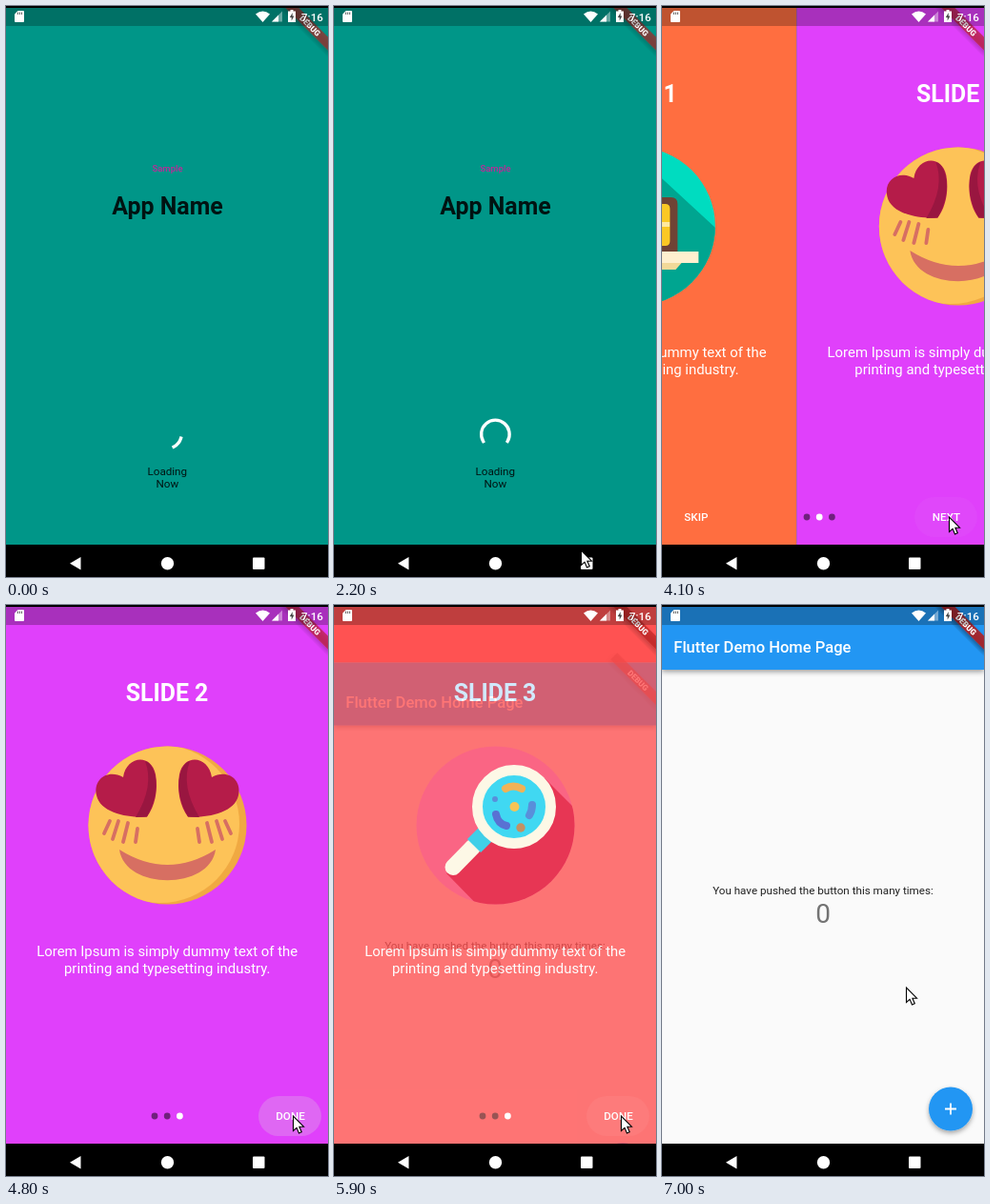
These frames come from a looping animation (338x600 px, 7.1 s). An HTML page:

```html
<!DOCTYPE html>
<html lang="en">
<head>
<meta charset="utf-8">
<title>Intro slider demo</title>
<style>
  html, body { margin: 0; width: 100%; height: 100%; overflow: hidden; background: #000; }
  svg { display: block; width: 338px; height: 600px; }
  text { font: 11.65px Roboto, sans-serif; }
  .mid { text-anchor: middle; }
  .dark { fill: rgba(0, 0, 0, .87); }
  .white { fill: #fff; }
  .big { font-size: 24.9px; font-weight: 700; }
  .body { font-size: 14.92px; }
  .btn { font-weight: 500; }
</style>
</head>
<body>
<svg viewBox="0 0 338 600">
  <defs>
    <clipPath id="disc"><circle cx="169.5" cy="231.5" r="83"/></clipPath>
    <clipPath id="app"><path d="M0 0H338V566H0Z"/></clipPath>
    <filter id="shadow" x="-30%" y="-30%" width="160%" height="180%">
      <feDropShadow dx="0" dy="2.5" stdDeviation="2.5" flood-opacity=".35"/>
    </filter>
    <g id="banner" transform="translate(339 1) rotate(45)">
      <rect x="-36" y="23" width="72" height="9.9" fill="#b71c1c" fill-opacity=".63" filter="url(#shadow)"/>
      <text class="mid white" y="31" style="font-size:8.4px;font-weight:900">DEBUG</text>
    </g>
    <g id="blurb" class="mid white">
      <text class="body" x="169.2" y="369.2">Lorem Ipsum is simply dummy text of the</text>
      <text class="body" x="169.2" y="386.700">printing and typesetting industry.</text>
    </g>
    <g id="eye">
      <path d="M148 222.500C130 224 99 219 95 200C91 182 108 172 123 181C126 159 152 155 157 178C160 195 156 212 148 222.500Z" fill="#b51c49"/>
      <path d="M148 222.500C156 208 160 192 156 177Q153 166 146 164Q156 190 136 223Z" fill="#991640"/>
      <path d="M109 227L103 240M118 227L112 246M128 229L123 249M138 235L136 249" fill="none" stroke="#d76f62" stroke-width="3.800" stroke-linecap="round"/>
    </g>
  </defs>

  <g clip-path="url(#app)">
    <g id="splash">
      <path d="M0 0H338V566H0Z" fill="#009688"/>
      <text class="mid btn" x="169.5" y="174" fill="#c0289a" style="font-size:9.5px">Sample</text>
      <text class="mid dark big" x="169.5" y="218.500">App Name</text>
      <path id="spinner" fill="none" stroke="#fff" stroke-width="3.3" stroke-linecap="square"/>
      <text class="mid dark" x="169.3" y="492.5">Loading</text>
      <text class="mid dark" x="169.3" y="506">Now</text>
    </g>

    <g id="intro">
      <g id="pages">
        <g>
          <path d="M0 0H338V566H0Z" fill="#ff6e40"/>
          <text class="mid white big" x="169" y="101.2">SLIDE 1</text>
          <g clip-path="url(#disc)">
            <path d="M80 140H260V320H80Z" fill="#00dcc0"/>
            <path d="M179 165L270 249V330H165L102 270L170 250Z" fill="#00a590"/>
            <path d="M126 201H170V257H126Z" fill="#ffdf82"/>
            <path d="M170 207H206V257H170Z" fill="#fbc824"/>
            <path d="M126 227H170V232H126Z" fill="#fff6dc"/>
            <path d="M170 227H205V232H170Z" fill="#ffe9a0"/>
            <path d="M126 201H170V208H126ZM126 253H170V258H126Z" fill="#8a5c48"/>
            <path d="M170 201H206Q213 201 213 208V258H170V252H200Q205 252 205 247V213Q205 208 200 208H170Z" fill="#6f4335"/>
            <path d="M169 186Q168 168 178 166" fill="none" stroke="#5d3327" stroke-width="3" stroke-linecap="round"/>
            <circle cx="169.5" cy="193" r="10.5" fill="#e5203e"/>
            <path d="M169.5 182.5A10.5 10.5 0 0 1 169.5 203.5Z" fill="#c4122f"/>
            <path d="M120 269H170V277H127Z" fill="#ffe9b8"/>
            <path d="M170 269H218L211 277H170Z" fill="#f2d999"/>
            <path d="M102 258H170V270H102Z" fill="#fffbef"/>
            <path d="M170 258H235V270H170Z" fill="#fff0cf"/>
          </g>
          <use href="#blurb"/>
        </g>
        <g transform="translate(338)">
          <path d="M0 0H338V566H0Z" fill="#e040fb"/>
          <text class="mid white big" x="169" y="101.2">SLIDE 2</text>
          <g clip-path="url(#disc)">
            <path d="M80 140H260V320H80Z" fill="#f0a942"/>
            <circle cx="162" cy="230" r="83" fill="#fdc358"/>
          </g>
          <use href="#eye"/>
          <use href="#eye" transform="matrix(-1 0 0 1 339 0)"/>
          <path d="M119 257Q169.5 289 220 257C214 300 125 300 119 257Z" fill="#d76f62"/>
          <use href="#blurb"/>
        </g>
        <g transform="translate(676)">
          <path d="M0 0H338V566H0Z" fill="#ff5252"/>
          <text class="mid white big" x="169" y="101.2">SLIDE 3</text>
          <g clip-path="url(#disc)">
            <path d="M80 140H260V320H80Z" fill="#fb3f66"/>
            <path d="M221 182L270 231V330H165L118 282Z" fill="#e30429"/>
          </g>
          <path d="M146 254L125 275.500" stroke="#fff8e2" stroke-width="17" stroke-linecap="round"/>
          <path d="M159 241L147 253" stroke="#10c4e4" stroke-width="20"/>
          <circle cx="189" cy="212" r="38.5" fill="#10d0f0" stroke="#fff8e2" stroke-width="11"/>
          <g fill="none" stroke-width="8" stroke-linecap="round">
            <path d="M180 193Q188 188 197 193" stroke="#eea02c"/>
            <path d="M170 220Q172 230 181 232" stroke="#2f4fc9"/>
            <path d="M208 210Q208 216 205 221" stroke="#2f74d2"/>
          </g>
          <circle cx="189.5" cy="212" r="5" fill="#f5b62c"/>
          <circle cx="169" cy="204" r="3" fill="#2f74d2"/>
          <circle cx="196" cy="234" r="4.7" fill="#b5763c"/>
          <use href="#blurb"/>
        </g>
      </g>
      <rect id="pill" x="265" y="516" width="66" height="42" rx="21" fill="#dcdcdc"/>
      <text id="skip" class="btn white" x="23.300" y="541">SKIP</text>
      <text id="next" class="btn mid white" x="298.5" y="541"></text>
      <g id="dots">
        <circle cx="156" cy="537" r="3.4"/><circle cx="169.2" cy="537" r="3.4"/><circle cx="182.4" cy="537" r="3.4"/>
      </g>
    </g>

    <g id="home">
      <path d="M0 2H338V566H0Z" fill="#fafafa"/>
      <path d="M0 2H338V68H0Z" fill="#2196f3" filter="url(#shadow)"/>
      <text class="white btn" x="12.3" y="50" style="font-size:16.55px">Flutter Demo Home Page</text>
      <text class="mid dark" x="169" y="304">You have pushed the button this many times:</text>
      <text class="mid" x="169" y="333.5" fill-opacity=".54" style="font-size:28px">0</text>
      <circle cx="303" cy="529.5" r="23" fill="#2196f3" filter="url(#shadow)"/>
      <path d="M297 529.5H309M303 523.5V535.5" stroke="#fff" stroke-width="1.8"/>
      <use href="#banner"/>
    </g>
    <use href="#banner"/>
    <path d="M0 0H338V21H0Z" fill-opacity=".25"/>
    <path d="M0 0H338V2H0Z"/>
  </g>

  <g class="white">
    <path d="M12.5 5H18Q19 5 19 6V16Q19 17 18 17H10Q9 17 9 16V8.5Z"/>
    <path d="M12.5 6.5V9M14.5 6.5V9M16.5 6.5V9" stroke="#555" stroke-width=".9"/>
    <path d="M262 8.5Q269.5 2.5 277 8.5L269.5 17Z"/>
    <path d="M290 5.5V16.5H279Z" opacity=".4"/>
    <path d="M286 9.5V16.5H279Z"/>
    <path d="M298.5 4H301.5V5.5H304V17H296V5.5H298.5Z"/>
    <path d="M300.8 7L297.8 12H299.7V15.5L302.4 10.5H300.6Z" fill="#444"/>
    <text class="btn" x="310" y="15.5">7:16</text>
  </g>
  <g fill="#fff">
    <path d="M78.5 579V592.5L67 585.7Z"/>
    <circle cx="169.5" cy="585.7" r="6.7"/>
    <rect x="259" y="579.5" width="12.5" height="12.5" rx="1"/>
  </g>
  <path id="cursor" d="M.5 0V15.5L4.1 12.3L6.5 18L9.3 16.8L6.9 11.2H11.5Z" fill="#fff" stroke="#000" stroke-width="1.1"/>
</svg>
<script>
  const LOOP = 7100, INTRO = 2700, HOME = 5785;
  const CLICKS = [3980, 4800, HOME];
  const CURSOR = [[1600, 248, 602], [2150, 259, 572], [2550, 259, 572], [3400, 307, 545], [3650, 307, 545],
                  [3900, 301, 537], [6350, 301, 537], [6850, 256, 402], [LOOP, 256, 402]];
  const el = id => document.getElementById(id);
  const clamp = v => Math.min(1, Math.max(0, v));
  const span = (t, start, length) => clamp((t - start) / length);

  function bezier(x1, y1, x2, y2) {
    const at = (s, a, b) => 3 * s * (1 - s) ** 2 * a + 3 * s * s * (1 - s) * b + s ** 3;
    return x => {
      let lo = 0, hi = 1;
      for (let i = 0; i < 24; i++) {
        const m = (lo + hi) / 2;
        if (at(m, x1, x2) < x) lo = m; else hi = m;
      }
      return at(lo, y1, y2);
    };
  }
  const fastOutSlowIn = bezier(.4, 0, .2, 1), easeIn = bezier(.42, 0, 1, 1), ease = bezier(.25, .1, .25, 1);

  function spin(t) {
    const time = t / 1000 + 2.11, p = time % 1, step = Math.floor(time) % 5;
    const head = fastOutSlowIn(clamp(p * 2)), tail = fastOutSlowIn(clamp(p * 2 - 1));
    const start = Math.PI * (-.5 + 1.5 * tail + 1.7 * p - .8 * step);
    const sweep = Math.max(1.5 * Math.PI * (head - tail), .001);
    const point = a => `${169.4 + 14.8 * Math.cos(a)} ${450 + 14.8 * Math.sin(a)}`;
    el('spinner').setAttribute('d',
      `M${point(start)}A14.8 14.8 0 ${sweep > Math.PI ? 1 : 0} 1 ${point(start + sweep)}`);
  }

  // Page entry: rises a quarter of the screen while fading in
  function enter(id, t, start) {
    const p = span(t, start, 300), node = el(id);
    node.style.display = p > 0 ? '' : 'none';
    node.setAttribute('opacity', easeIn(p));
    node.setAttribute('transform', `translate(0 ${141 * (1 - fastOutSlowIn(p))})`);
  }

  function moveCursor(t) {
    const i = CURSOR.findIndex(k => k[0] > t), b = CURSOR[i], a = CURSOR[i - 1] || b;
    const p = a === b ? 0 : span(t, a[0], b[0] - a[0]), s = p * p * (3 - 2 * p);
    el('cursor').setAttribute('transform',
      `translate(${a[1] + (b[1] - a[1]) * s} ${a[2] + (b[2] - a[2]) * s})`);
  }

  function draw() {
    const t = performance.now() % LOOP;
    spin(t);
    enter('intro', t, INTRO);
    enter('home', t, HOME);
    moveCursor(t);

    const page = ease(span(t, 4000, 300)) + ease(span(t, 4805, 300));
    const index = (t >= 3980) + (t >= 4760), last = index === 2;
    el('pages').setAttribute('transform', `translate(${-338 * page})`);
    el('skip').style.display = last ? 'none' : '';
    el('next').textContent = last ? 'DONE' : 'NEXT';
    el('dots').setAttribute('transform', `translate(${last ? 0 : -4})`);
    [...el('dots').children].forEach((dot, i) =>
      dot.setAttribute('fill', i === index ? '#fff' : 'rgba(0,0,0,.5)'));

    const press = Math.max(...CLICKS.map(c => span(t, c - 120, 100) * (1 - span(t, c + 20, 120))));
    el('pill').setAttribute('opacity', .25 * press);
    requestAnimationFrame(draw);
  }
  draw();
</script>
</body>
</html>
```
